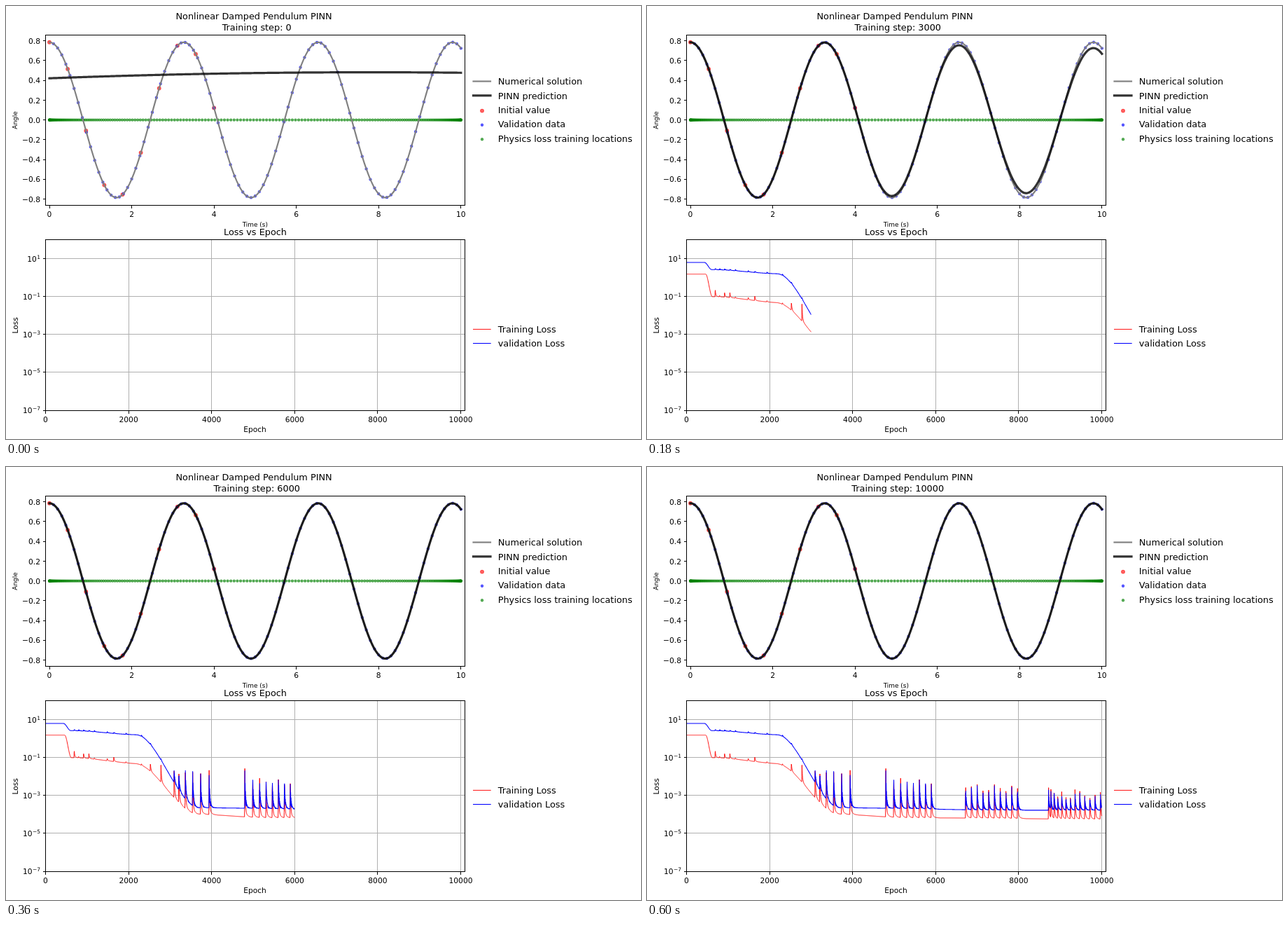
These frames come from a looping animation (907 px wide and 618 px high, 660 ms). An HTML page:

```html
<!DOCTYPE html>
<html lang="en">
<head>
<meta charset="utf-8">
<title>Pendulum training</title>
<style>
  html, body { margin: 0; width: 100%; height: 100%; overflow: hidden; background: #fff; }
  svg { display: block; font-family: "DejaVu Sans", Verdana, sans-serif; font-size: 10.7px; }
  path, line { fill: none; }
  path { stroke-linejoin: round; }
  .big { font-size: 12.85px; }
  .small { font-size: 8.92px; }
  .mid { text-anchor: middle; }
  .end { text-anchor: end; }
  .sup { font-size: 7.5px; }
  .axis { stroke: #000; shape-rendering: crispEdges; }
  .grid { stroke: #b0b0b0; shape-rendering: crispEdges; }
  .exact { stroke: #808080; stroke-width: 2.15; stroke-linecap: square; }
  .guess { stroke: #000; stroke-width: 3.2; stroke-linecap: square; opacity: .8; }
  .train { stroke: #f00; stroke-width: .95; }
  .valid { stroke: #00f; stroke-width: 1.07; }
  circle { fill-opacity: .6; stroke-opacity: .6; stroke-width: 1.07; }
  .red { fill: #f00; stroke: #f00; }
  .blue { fill: #00f; stroke: #00f; }
  .green { fill: #008000; stroke: #008000; }
</style>
</head>
<body>
<svg id="stage" width="907" height="618" viewBox="0 0 907 618"></svg>
<script>
const stage = document.getElementById('stage');
const LEFT = 56.5, RIGHT = 655.5, STEP_MS = 60, STEPS = 11;

// data to pixels
const timeX = t => 62 + 58.78 * t;
const angleY = a => 162.6 - 141.1 * a;
const epochX = e => LEFT + 0.0593 * e;
const lossY = p => 577 - 27.05 * (p + 7);

function add(tag, attrs, content) {
  const el = document.createElementNS('http://www.w3.org/2000/svg', tag);
  for (const k in attrs) el.setAttribute(k, attrs[k]);
  if (content !== undefined) el.textContent = content;
  return stage.appendChild(el);
}
const text = (x, y, cls, s) => add('text', { x, y, class: cls }, s);
const line = (x1, y1, x2, y2, cls) => add('line', { x1, y1, x2, y2, class: cls });
const dot = (cx, cy, r, cls) => add('circle', { cx, cy, r, class: cls });
const upright = (x, y, cls, s) =>
  add('text', { class: cls, transform: `translate(${x} ${y}) rotate(-90)` }, s);
const toPath = pts => 'M' + pts.map(p => p[0].toFixed(2) + ' ' + p[1].toFixed(2)).join('L');
const signed = s => String(s).replace('-', '\u2212');
const span = (n, f) => Array.from({ length: n }, (_, i) => f(i));

// pendulum
const swing = t => Math.PI / 4 * Math.cos(1.9245 * t);
const fade = (t, mid, width) => 1 / (1 + Math.exp((t - mid) / width));

// early fits: the swing dies out too soon, then settles on the solution
const fits = {
  0: t => .482 - .001 * (t - 7.8) ** 2,
  1: t => swing(t) * (1.03 - .02 * t) * fade(t, 5.75, .8) - .055 * Math.exp(-(((t - 8.6) / 1.8) ** 2)),
  2: t => swing(t) * fade(t, 6.6, 1),
  3: t => swing(t) * (1 - .011 * Math.max(0, t - 3)),
  5: t => swing(t + .02) + .02 - .003 * t
};
const curve = f => toPath(span(401, i => [timeX(i / 40), angleY(f(i / 40))]));

// loss as log10: smooth falls plus bursts of spikes that decay
function ease(e, from, to) {
  const u = Math.min(1, Math.max(0, (e - from) / (to - from)));
  return u * u * (3 - 2 * u);
}
const trainBase = e => .185 - 1.19 * ease(e, 460, 620) - .33 * ease(e, 600, 2400)
  - 2.65 * ease(e, 2160, 3680) - .2 * ease(e, 3500, 5500) - .07 * ease(e, 6000, 10000);
const validBase = e => .8 - .38 * ease(e, 430, 610) - .22 * ease(e, 600, 2300)
  - 3.85 * ease(e, 2180, 3700) - .13 * ease(e, 3600, 8000);

let seed = 7;
function random() {
  seed = (seed * 16807) % 2147483647;
  return seed / 2147483647;
}

const bursts = [
  { from: 690, to: 1175, count: 5, bend: 1.1 },
  { from: 1485, to: 2310, count: 4, bend: 1.5 },
  { from: 2525, to: 2780, count: 2, bend: 1 },
  { from: 3097, to: 3940, count: 6, bend: 1.25 },
  { from: 4800, to: 5895, count: 8, bend: .9 },
  { from: 6722, to: 7970, count: 10, bend: 1 },
  { from: 8720, to: 9968, count: 13, bend: 1.25 }
];
const spikes = bursts.flatMap(({ from, to, count, bend }) => span(count, i => {
  const at = from + (to - from) * (i / (count - 1)) ** bend;
  return { at, peak: -.45 - .00023 * at - .45 * random() };
}));

function pulse(d, decay) {
  if (d < -6 || d > 200) return 0;
  return d < 0 ? 1 + d / 6 : .85 * Math.exp(-d / decay) + .15 * Math.exp(-d / 45);
}
function lossCurve(base, drop, decay, shake) {
  return span(2501, i => {
    const e = i * 4;
    const rise = spikes.reduce((top, { at, peak }) =>
      Math.max(top, Math.max(.07, peak - drop - base(at)) * pulse(e - at, decay)), 0);
    return [epochX(e), lossY(base(e) + rise * (1 - shake * (i % 2) * random()))];
  });
}
const trainPts = lossCurve(trainBase, 0, 11, 0);
const validPts = lossCurve(validBase, .12, 18, .8);

// upper chart
span(200, i => dot(timeX(5 - 5 * Math.cos(Math.PI * i / 199)), angleY(0), 1.65, 'green'));
const sample = (t, r, cls) => dot(timeX(t), angleY(swing(t)), r, cls);
span(10, i => sample(i * 4 / 9, 2.4, 'red'));
span(100, i => sample((i + 1) / 10, 1.65, 'blue'));
add('path', { class: 'exact', d: curve(swing) });
const guess = add('path', { class: 'guess' });

function frame(top, bottom) {
  add('path', { class: 'axis', d: `M${LEFT} ${top}H${RIGHT}V${bottom}H${LEFT}Z` });
}
function tickX(x, y, label) {
  line(x, y, x, y + 4, 'axis');
  text(x, y + 16, 'mid', label);
}
frame(41.5, 284.5);
for (let t = 0; t <= 10; t += 2) tickX(timeX(t), 284.5, t);
for (let k = -4; k <= 4; k++) {
  const y = angleY(k / 5);
  line(LEFT - 4, y, LEFT, y, 'axis');
  text(49, y + 4.2, 'end', signed((k / 5).toFixed(1)));
}
text(354.1, 18.6, 'big mid', 'Nonlinear Damped Pendulum PINN');
const title = text(358.2, 34.5, 'big mid', '');
text(355.8, 314.6, 'small mid', 'Time (s)');
upright(15.8, 163, 'small mid', 'Angle');

// lower chart
for (let e = 2000; e <= 10000; e += 2000) line(epochX(e), 333.5, epochX(e), 577, 'grid');
for (let p = -5; p <= 1; p += 2) line(LEFT, lossY(p), RIGHT, lossY(p), 'grid');
const train = add('path', { class: 'train' });
const valid = add('path', { class: 'valid' });
frame(333.5, 577.5);
for (let e = 0; e <= 10000; e += 2000) tickX(epochX(e), 577.5, e);
for (let p = -7; p <= 1; p += 2) {
  const y = lossY(p);
  line(LEFT - 4, y, LEFT, y, 'axis');
  text(49, y + .4, 'sup end', signed(p));
  text(p < 0 ? 37.6 : 43.9, y + 4.4, 'end', '10');
}
text(356, 327, 'big mid', 'Loss vs Epoch');
text(355.5, 608, 'mid', 'Epoch');
upright(16.6, 455.8, 'mid', 'Loss');

// legends
const key = (y, s) => text(702.7, y + 4.5, 'big', s);
['Numerical solution', 'PINN prediction', 'Initial value', 'Validation data',
  'Physics loss training locations'].forEach((s, i) => key(107.7 + 20.4 * i, s));
line(667.5, 107.5, 692, 107.5, 'exact');
line(667.5, 127.8, 692, 127.8, 'guess');
dot(680, 149.6, 2.4, 'red');
dot(680, 169.8, 1.65, 'blue');
dot(680, 190.2, 1.65, 'green');
line(667, 461.4, 692.7, 461.4, 'train');
line(667, 481.5, 692.7, 481.5, 'valid');
key(461.4, 'Training Loss');
key(481.6, 'validation Loss');

function show(step) {
  const count = step ? step * 250 + 1 : 0;
  const reveal = pts => count ? toPath(pts.slice(0, count)) : '';
  guess.setAttribute('d', curve(fits[step] || swing));
  title.textContent = 'Training step: ' + step * 1000;
  train.setAttribute('d', reveal(trainPts));
  valid.setAttribute('d', reveal(validPts));
}

let shown = 0;
const start = performance.now();
show(0);
function tick() {
  const step = Math.floor((performance.now() - start) / STEP_MS) % STEPS;
  if (step !== shown) show(shown = step);
  requestAnimationFrame(tick);
}
requestAnimationFrame(tick);
</script>
</body>
</html>
```
